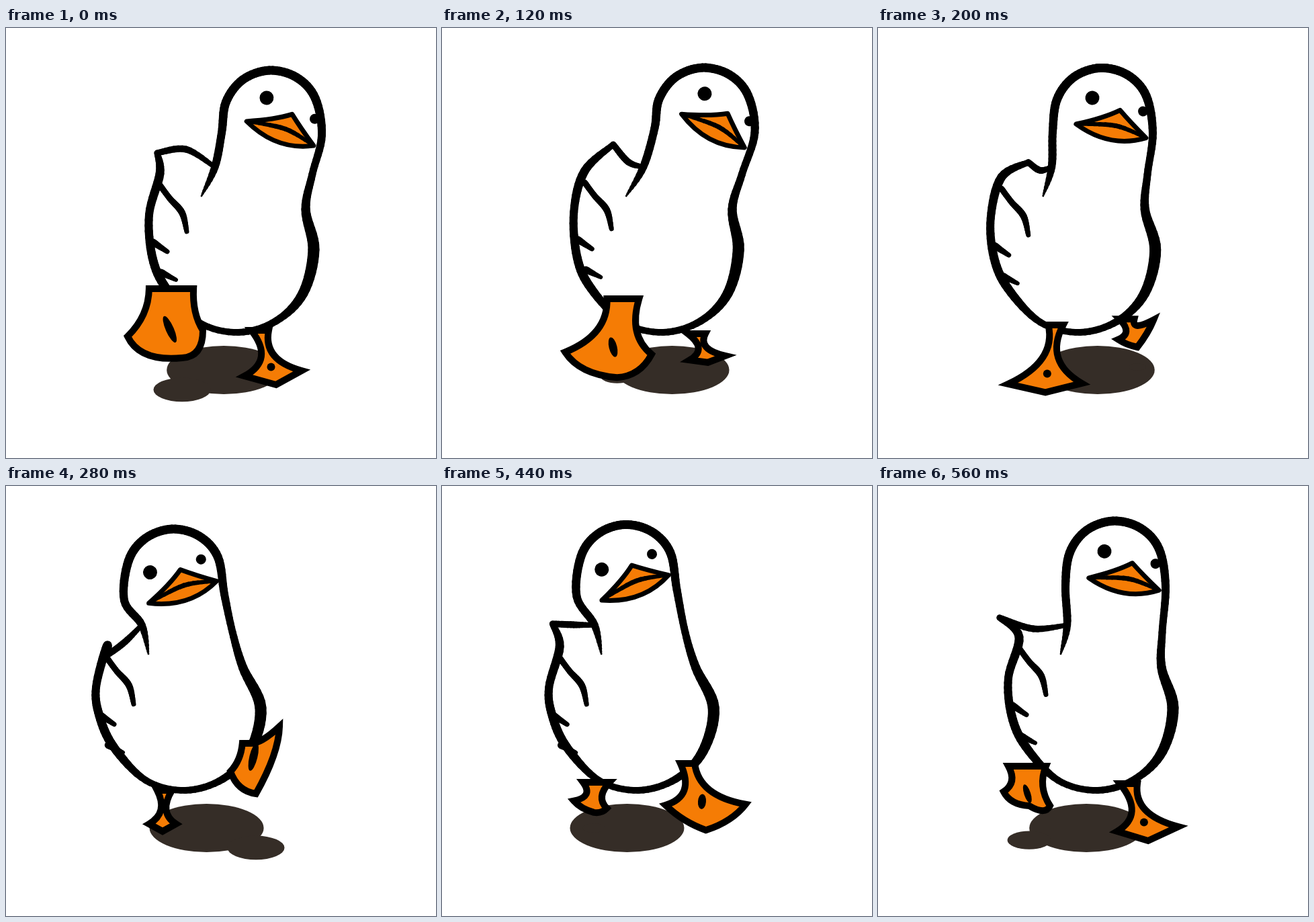
Write an HTML page with a canvas that moves like this. It is 640 px wide and 640 px high and loops after 600 ms.

```html
<!DOCTYPE html>
<html lang="en">
<head>
<meta charset="utf-8">
<title>Walking duck</title>
<style>
  html, body { margin: 0; width: 100%; height: 100%; overflow: hidden; background: #fff; }
  canvas { display: block; width: 640px; height: 640px; }
</style>
</head>
<body>
<canvas id="stage" width="640" height="640"></canvas>
<script>
const ctx = document.getElementById('stage').getContext('2d');
const STEP = 40, STEPS = 15;
const INK = '#000', ORANGE = '#f57c05', SHADE = '#352d27';

// Key poses of the walk; every track below has one value per pose.
const KEYS = [0, 2, 4, 7, 9, 12, 14];

const torso = {
  body: [335, 326, 307, 256, 258, 294, 316],
  faceX: [408, 409, 386, 263, 256, 309, 366],
  faceY: [157, 155, 152, 158, 163, 146, 146],
  tilt: [20, 27, 24, -18, -23, -16, 10],
  tailX: [225, 242, 255, 152, 177, 160, 181],
  tailY: [186, 180, 175, 251, 202, 208, 196],
  sag: [-16, 5, 10, 3, 0, 2, 11]
};
const leftFoot = {
  hipX: [246, 258, 275, 236, 239, 225, 222],
  hipY: [388, 378, 430, 453, 443, 438, 417],
  inX: [181, 184, 185, 213, 208, 191, 187],
  inY: [459, 434, 529, 503, 498, 456, 455],
  tipX: [262, 262, 257, 233, 236, 222, 225],
  tipY: [491, 489, 547, 514, 507, 477, 476],
  outX: [293, 294, 322, 253, 261, 240, 256],
  outY: [450, 440, 528, 503, 490, 476, 476],
  lift: [0.85, 1, 0, 0, 0, 0.5, 0.65]
};
const rightFoot = {
  hipX: [378, 379, 377, 358, 372, 363, 373],
  hipY: [450, 450, 453, 383, 356, 440, 443],
  inX: [355, 366, 367, 334, 322, 340, 356],
  inY: [518, 504, 481, 425, 386, 516, 514],
  tipX: [402, 398, 392, 372, 358, 408, 402],
  tipY: [531, 510, 486, 458, 467, 531, 528],
  outX: [440, 430, 414, 407, 413, 466, 447],
  outY: [510, 494, 473, 358, 399, 504, 507],
  lift: [0, 0, 0, 0.85, 0.95, 0, 0]
};

const lerp = (a, b, t) => a + (b - a) * t;
const mix = (p, q, t) => [lerp(p[0], q[0], t), lerp(p[1], q[1], t)];

// Smooth cyclic value of each track.
function sample(tracks, step) {
  const n = KEYS.length;
  const k = KEYS.findLastIndex(at => at <= step);
  const time = i => KEYS[(i + n) % n] + Math.floor(i / n) * STEPS;
  const span = time(k + 1) - time(k), u = (step - time(k)) / span;
  const out = {};
  for (const name in tracks) {
    const v = i => tracks[name][(i + n) % n];
    const slope = i => (v(i + 1) - v(i - 1)) / (time(i + 1) - time(i - 1)) * span;
    out[name] = lerp(v(k), v(k + 1), u * u * (3 - 2 * u))
      + slope(k) * u * (1 - u) ** 2 + slope(k + 1) * u * u * (u - 1);
  }
  return out;
}

// Smooth stroke through [x, y, width] points.
function brush(pts, fill) {
  const cut = 8, dots = [];
  const at = i => pts[Math.max(0, Math.min(pts.length - 1, i))];
  for (let s = 0; s <= (pts.length - 1) * cut; s++) {
    const i = Math.floor(s / cut), t = s / cut - i;
    const [p, q, r, w] = [at(i - 1), at(i), at(i + 1), at(i + 2)];
    dots.push(q.map((b, j) => b + t / 2 * (r[j] - p[j] + t * (2 * p[j] - 5 * b + 4 * r[j] - w[j]
      + t * (3 * (b - r[j]) + w[j] - p[j])))));
  }
  if (fill) {
    ctx.beginPath();
    dots.forEach(([x, y]) => ctx.lineTo(x, y));
    ctx.fillStyle = fill;
    ctx.fill();
  }
  ctx.lineCap = 'round';
  for (let i = 1; i < dots.length; i++) {
    ctx.lineWidth = Math.max(1, dots[i][2]);
    ctx.beginPath();
    ctx.moveTo(dots[i - 1][0], dots[i - 1][1]);
    ctx.lineTo(dots[i][0], dots[i][1]);
    ctx.stroke();
  }
}

// Closed orange shape from a start and [control, end] curves.
function patch(start, curves, width) {
  ctx.beginPath();
  ctx.moveTo(...start);
  curves.forEach(([c, e]) => ctx.quadraticCurveTo(...c, ...e));
  ctx.closePath();
  ctx.fillStyle = ORANGE;
  ctx.fill();
  ctx.lineWidth = width;
  ctx.stroke();
}

function oval(x, y, rx, ry, deg = 0) {
  ctx.beginPath();
  ctx.ellipse(x, y, Math.max(0, rx), Math.max(0, ry), deg * Math.PI / 180, 0, 7);
  ctx.fill();
}

// The main shadow drifts with the walk; a raised foot casts its own.
function drawShadows(step, feet) {
  ctx.fillStyle = SHADE;
  oval(308 + 35 * Math.cos((step - 2.6) / STEPS * 2 * Math.PI), 509, 85, 36);
  for (const { tipX, lift } of feet) oval(tipX, 490 + 57 * lift, 50 * lift, 21 * lift);
}

function drawBody({ body: b, faceX, faceY, tilt, tailX, tailY, sag }) {
  const lean = faceX - b, wing = 258 - 0.33 * lean;
  const neck = [b - 57 + 0.45 * lean, 207];
  const dome = [];
  for (let i = 0; i < 5; i++) {
    const a = (200 + i * 33.75) * Math.PI / 180;
    dome.push([faceX - 13 + 72 * Math.cos(a), faceY - 22 + 72 * Math.sin(a), 13]);
  }
  brush([
    [b - 44, 250, 2], [...neck, 11], [faceX - 87, faceY + 6 - 0.35 * tilt, 12],
    ...dome,
    [faceX + 62, faceY + 3, 12], [b + 77 + 0.6 * lean, 218, 11], [b + 95 + 0.22 * lean, 270, 13],
    [b + 123, 330, 17], [b + 107, 395, 15], [b + 67, 436, 11], [b + 11, 453, 10],
    [b - 48, 438, 10], [b - 96, 388, 13], [b - 117, 342, 13], [b - 122, wing + 44, 12],
    [b - 106, wing - 17, 13], [tailX, tailY, 9]
  ], '#fff');

  const [mx, my] = mix([tailX, tailY], neck, 0.5);
  brush([[tailX, tailY, 9], [mx, my + sag, 10], [...neck, 7]]);
  brush([[b - 106, wing, 9], [b - 91, wing + 20, 9], [b - 73, wing + 41, 10], [b - 66, wing + 69, 7]]);
  brush([[b - 116, wing + 85, 11], [b - 95, wing + 99, 7]]);
  brush([[b - 104, wing + 130, 11], [b - 82, wing + 141, 6]]);
}

// The face is rigid and only moves and tilts.
function drawFace({ faceX, faceY, tilt }) {
  ctx.save();
  ctx.translate(faceX, faceY);
  ctx.rotate(tilt * Math.PI / 180);
  ctx.fillStyle = INK;
  oval(-37, -43, 10.5, 10.5);
  oval(41, -38, 7.5, 7.5);
  ctx.lineJoin = 'round';
  patch([-53, 0], [[[-14, -17], [7, -33]], [[26, -18], [53, 0]], [[3, 26], [-53, 0]]], 7);
  brush([[-53, 0, 4], [5, -9, 7], [53, 0, 5]]);
  ctx.restore();
}

// spread: leg half width on the ground and in the air; turn: slit angle in the air.
function drawFoot({ hipX, hipY, inX, inY, tipX, tipY, outX, outY, lift }, spread, turn) {
  const hip = [hipX, hipY], tip = [tipX, tipY], toeIn = [inX, inY], toeOut = [outX, outY];
  const half = lerp(...spread, lift), core = mix(hip, tip, 0.53);
  const legIn = [hipX - half, hipY], legOut = [hipX + half, hipY];
  const pinch = (p, q, side) => {
    const [x, y] = mix(mix(p, q, 0.5), core, 1.1 - lift);
    return [x + side * 6 * (1 - lift), y];
  };
  const bulge = toe => mix(core, mix(toe, tip, 0.5), 1 + 0.8 * lift);
  ctx.lineJoin = 'miter';
  ctx.miterLimit = 5;
  patch(legIn, [
    [pinch(legIn, toeIn, 1), toeIn], [bulge(toeIn), tip],
    [bulge(toeOut), toeOut], [pinch(legOut, toeOut, -1), legOut]
  ], 10);

  // Only a foot near the viewer is wide enough to show its slit.
  const r = Math.min(6, 0.6 * (Math.hypot(outX - inX, outY - inY) - 64));
  ctx.fillStyle = INK;
  oval(...mix(mix(toeIn, toeOut, 0.5), mix(hip, tip, 0.5), 0.4), r, r * (1 + 3 * lift), turn * lift);
}

function draw(step) {
  const duck = sample(torso, step);
  const [left, right] = [leftFoot, rightFoot].map(foot => {
    const pose = sample(foot, step);
    pose.lift = Math.max(0, Math.min(1, pose.lift));
    return pose;
  });
  ctx.fillStyle = '#fff';
  ctx.fillRect(0, 0, 640, 640);
  ctx.strokeStyle = INK;
  drawShadows(step, [left, right]);
  drawBody(duck);
  drawFoot(right, [13, 5], 16);
  drawFoot(left, [11, 37], -28);
  drawFace(duck);
}

let last = -1;
function tick() {
  const step = Math.floor(performance.now() / STEP) % STEPS;
  if (step !== last) draw(last = step);
  requestAnimationFrame(tick);
}
tick();
</script>
</body>
</html>
```
